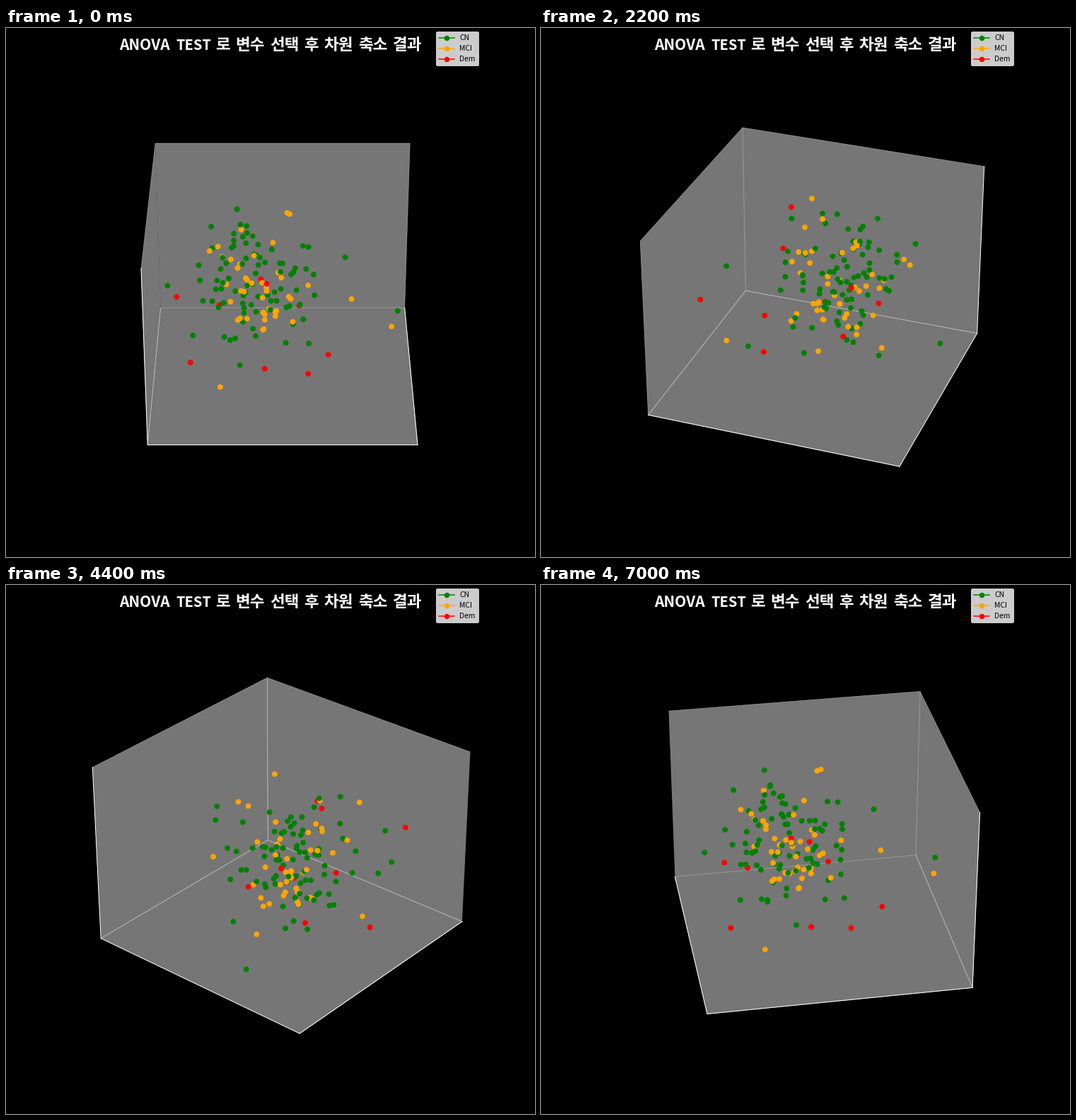
These frames come from a looping animation (748 by 748 pixels, 7.2 s). A matplotlib script:

```python
import numpy as np
import matplotlib.pyplot as plt
from matplotlib.animation import FuncAnimation
from matplotlib.patches import FancyBboxPatch

SIZE, DPI = 748, 72
FRAMES, INTERVAL = 36, 200
HALF_XY, HALF_Z = 185.3, 139.0
FONT = "Noto Sans CJK JP"
PANE = (0.925, 0.925, 0.925, 0.5)

# name: colour, cloud size, cloud centre, cloud spread, points far outside it
GROUPS = {
    "CN": ("green", 78, (-22, -48, 3), (36, 40, 43),
           [(163, -58, -24), (-162, -71, -96), (42, 161, -10),
            (11, -162, 13), (-42, 89, 29), (92, -124, -20)]),
    "MCI": ("orange", 41, (-12, -40, -2), (42, 40, 45),
            [(78, 151, -14), (-37, 99, -37), (74, -88, -116),
             (-108, -60, 38)]),
    "Dem": ("red", 0, (0, 0, 0), (0, 0, 0),
            [(94, -145, 43), (-61, -92, -61), (-40, -31, -6),
             (60, -22, 44), (-47, 24, -54), (154, 62, -13),
             (36, -131, -99), (91, -25, -75), (69, 36, -97)]),
}


def make_points():
    rng = np.random.default_rng(12)
    points, colors = [], []
    for color, count, centre, spread, far in GROUPS.values():
        # Three uniform draws add up to a bell shape with bounded tails.
        bell = rng.uniform(-1, 1, (3, count, 3)).sum(axis=0)
        points += [*(centre + bell * spread), *far]
        colors += [color] * (count + len(far))
    return np.array(points), colors


def draw_title(ax):
    def word(x, text, size):
        ax.text(x, 31, text, color="white", size=size, family=FONT,
                weight="bold", va="baseline")

    word(160, "ANOVA", 21)
    word(240.5, "TEST", 20)
    x, size, space = 296.5, 22.5, 7.2
    for text in "로 변수 선택 후 차원 축소 결과".split():
        word(x, text, size)
        x += 0.92 * size * len(text) + space


def draw_legend(ax):
    ax.add_patch(FancyBboxPatch(
        (610.5, 7.5), 56, 44, boxstyle="round,pad=2,rounding_size=2",
        fc="#cccccc", ec="#cccccc", lw=1))
    for row, (name, (color, *_)) in enumerate(GROUPS.items()):
        y = 13.5 + 15 * row
        ax.plot([612.5, 634], [y, y], color=color, lw=1.5)
        ax.plot(623.3, y, "o", color=color, ms=6.5)
        ax.text(641.5, y + 3.8, name, color="black", size=10.4, family=FONT,
                va="baseline")


fig = plt.figure(figsize=(SIZE / DPI, SIZE / DPI), dpi=DPI, facecolor="black")

ax = fig.add_subplot(projection="3d", facecolor="black")
ax.set(xlim=(-HALF_XY, HALF_XY), ylim=(-HALF_XY, HALF_XY),
       zlim=(-HALF_Z, HALF_Z), xticks=[], yticks=[], zticks=[])
ax.grid(False)
for axis in (ax.xaxis, ax.yaxis, ax.zaxis):
    axis.line.set(color="white", linewidth=1)
    axis.set_pane_color(PANE)
    axis.pane.set_linewidth(0.7)
points, colors = make_points()
ax.scatter(*points.T, c=colors, s=62, linewidths=0, depthshade=False)

# Flat layer in pixel coordinates for the title and the legend.
flat = fig.add_axes([0, 0, 1, 1])
flat.set(xlim=(0, SIZE), ylim=(SIZE, 0))
flat.axis("off")
draw_title(flat)
draw_legend(flat)


def update(i):
    ax.view_init(elev=30, azim=360 * i / FRAMES)
    return []


anim = FuncAnimation(fig, update, frames=FRAMES, interval=INTERVAL,
                     repeat=True, repeat_delay=0, blit=False)
plt.show()
```
